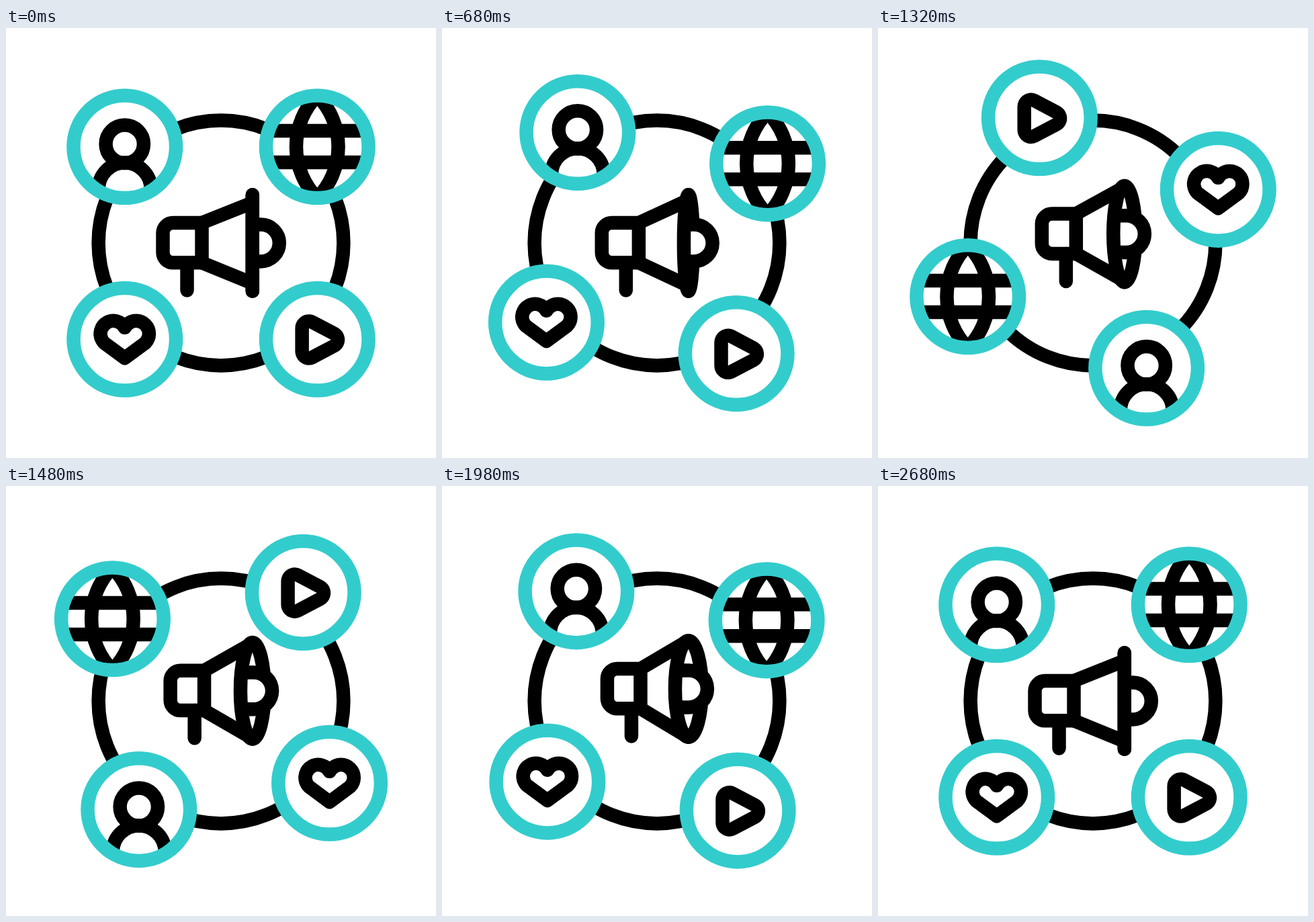
An HTML page with a canvas for the animation above (3 s loop, 640 by 640 pixels).

```html
<!DOCTYPE html>
<html lang="en">
<head>
<meta charset="utf-8">
<title>Promotion loop</title>
<style>
  html, body { margin: 0; width: 100%; height: 100%; overflow: hidden; background: #fff; }
  canvas { display: block; width: 640px; height: 640px; }
</style>
</head>
<body>
<canvas id="stage" width="640" height="640"></canvas>
<script>
const ctx = document.getElementById('stage').getContext('2d');
const LOOP = 3000, STEP = 20, INK = '#000', TEAL = '#33cccc', PAPER = '#fff';
const LINE = 20.5, CENTER = 320, ORBIT = 202.6, BADGE = 76.3;
const START = 205, WINDUP = 326, PEAK = 2153, REST = 2685;

// Cubic bezier easing from (0,0) to (1,1) with flat ends.
function flatEase(x1, x2) {
  return x => {
    if (x <= 0) return 0;
    if (x >= 1) return 1;
    let lo = 0, hi = 1, s = 0.5;
    for (let i = 0; i < 24; i++) {
      s = (lo + hi) / 2;
      const r = 1 - s;
      if (3 * x1 * s * r * r + 3 * x2 * s * s * r + s * s * s < x) lo = s; else hi = s;
    }
    return s * s * (3 - 2 * s);
  };
}

const easeWindup = flatEase(0.33, 0.67);
const easeSpin = flatEase(0.48, 0.557);
const easeTurn = flatEase(0.11, 0.3);
const easeSettle = flatEase(0.1, 0.1);

const lerp = (a, b, p) => a + (b - a) * p;

// Runs through rest -> windup -> peak -> settled values.
function track(t, values, easeMain) {
  const [rest, low, high, end] = values;
  if (t < WINDUP) return lerp(rest, low, easeWindup((t - START) / (WINDUP - START)));
  if (t < PEAK) return lerp(low, high, easeMain((t - WINDUP) / (PEAK - WINDUP)));
  return lerp(high, end, easeSettle((t - PEAK) / (REST - PEAK)));
}

function stroke(build, color = INK, width = LINE, fill = null) {
  ctx.beginPath();
  build();
  if (fill) { ctx.fillStyle = fill; ctx.fill(); }
  ctx.strokeStyle = color;
  ctx.lineWidth = width;
  ctx.stroke();
}

const circle = (x, y, r) => () => ctx.arc(x, y, r, 0, Math.PI * 2);

const line = (...points) => () => {
  points.forEach(([x, y], i) => i ? ctx.lineTo(x, y) : ctx.moveTo(x, y));
};

function person() {
  stroke(circle(0, -4, 28.2));
  stroke(circle(0, 62.7, 38.9));
}

function globe() {
  for (const y of [-23.7, 23.3]) stroke(line([-BADGE, y], [BADGE, y]));
  const bulge = 31.3;
  const radius = (BADGE ** 2 + bulge ** 2) / (2 * bulge);
  const half = Math.asin(BADGE / radius);
  stroke(() => ctx.arc(bulge - radius, 0, radius, -half, half));
  stroke(() => ctx.arc(radius - bulge, 0, radius, Math.PI - half, Math.PI + half));
}

function heart() {
  const dx = 17, y = -8.2, r = 19.2, notch = 0.506;
  stroke(() => {
    ctx.arc(-dx, y, r, -notch, Math.PI * 0.75, true);
    ctx.lineTo(0, y - dx + r * Math.SQRT2 + 2 * dx - 8);
    ctx.lineTo(0, y + dx + r * Math.SQRT2 - 2 * dx + 26);
    ctx.arc(dx, y, r, Math.PI * 0.25, Math.PI + notch, true);
    ctx.closePath();
  });
}

function play() {
  const triangle = () => {
    line([-12.4, -16.6], [-12.4, 18], [20.5, 0.7])();
    ctx.closePath();
  };
  stroke(triangle, INK, LINE * 2);
  ctx.fillStyle = PAPER;
  ctx.fill();
}

const badges = [person, globe, play, heart];

function drawBadge(icon, angle) {
  ctx.save();
  ctx.translate(CENTER + ORBIT * Math.cos(angle), CENTER + ORBIT * Math.sin(angle));
  ctx.beginPath();
  ctx.arc(0, 0, BADGE, 0, Math.PI * 2);
  ctx.fillStyle = PAPER;
  ctx.fill();
  ctx.save();
  ctx.clip();
  icon();
  ctx.restore();
  stroke(circle(0, 0, BADGE), TEAL);
  ctx.restore();
}

function drawMegaphone(turn, lift) {
  const left = lerp(233.5, 246, turn);
  const bar = lerp(291.5, 295.5, turn);
  const grip = lerp(269.5, 282, turn);
  const bell = 366.8, bellHeight = 71.7, bellWidth = 20 * turn;
  const hornX = lerp(366.8, 361.5, turn), hornY = lerp(60, 69, turn);
  const dome = lerp(379.4, 367.4, turn), domeRadius = 27.4;
  const top = -30, bottom = 29.3, corner = 15;

  ctx.save();
  ctx.translate(0, CENTER + lift);
  stroke(line([grip, bottom], [grip, 70.5]));
  stroke(() => {
    ctx.moveTo(bar, top);
    ctx.arcTo(left, top, left, 0, corner);
    ctx.arcTo(left, bottom, bar, bottom, corner);
    ctx.lineTo(bar, bottom);
    ctx.closePath();
  });
  stroke(line([bar, top], [hornX, -hornY]));
  stroke(line([bar, bottom], [hornX, hornY]));

  const halfBell = side => () => {
    ctx.ellipse(bell, 0, Math.max(bellWidth, 0.01), bellHeight, 0,
      -Math.PI / 2, Math.PI / 2, side < 0);
  };
  stroke(halfBell(1));
  ctx.lineCap = 'butt';
  stroke(() => {
    ctx.moveTo(bell - bellWidth, -domeRadius);
    ctx.arc(dome, 0, domeRadius, -Math.PI / 2, Math.PI / 2);
    ctx.lineTo(bell - bellWidth, domeRadius);
  }, INK, LINE, PAPER);
  ctx.lineCap = 'round';
  stroke(halfBell(-1));
  ctx.restore();
}

function draw(t) {
  ctx.fillStyle = PAPER;
  ctx.fillRect(0, 0, 640, 640);
  ctx.lineCap = ctx.lineJoin = 'round';

  const spin = track(t, [0, -15, 375, 360], easeSpin);
  const turn = track(t, [0, 0, 1, 0], easeTurn);
  const lift = track(t, [0, 9.5, -18.2, 0], easeTurn);

  stroke(circle(CENTER, CENTER, 182.4));
  drawMegaphone(turn, lift);
  badges.forEach((icon, i) => drawBadge(icon, (225 + 90 * i + spin) * Math.PI / 180));
}

// The picture advances in steps; the small margin absorbs clock rounding.
function tick() {
  const t = performance.now() % LOOP;
  draw(Math.floor((t + 4) / STEP) * STEP % LOOP);
  requestAnimationFrame(tick);
}
tick();
</script>
</body>
</html>
```
